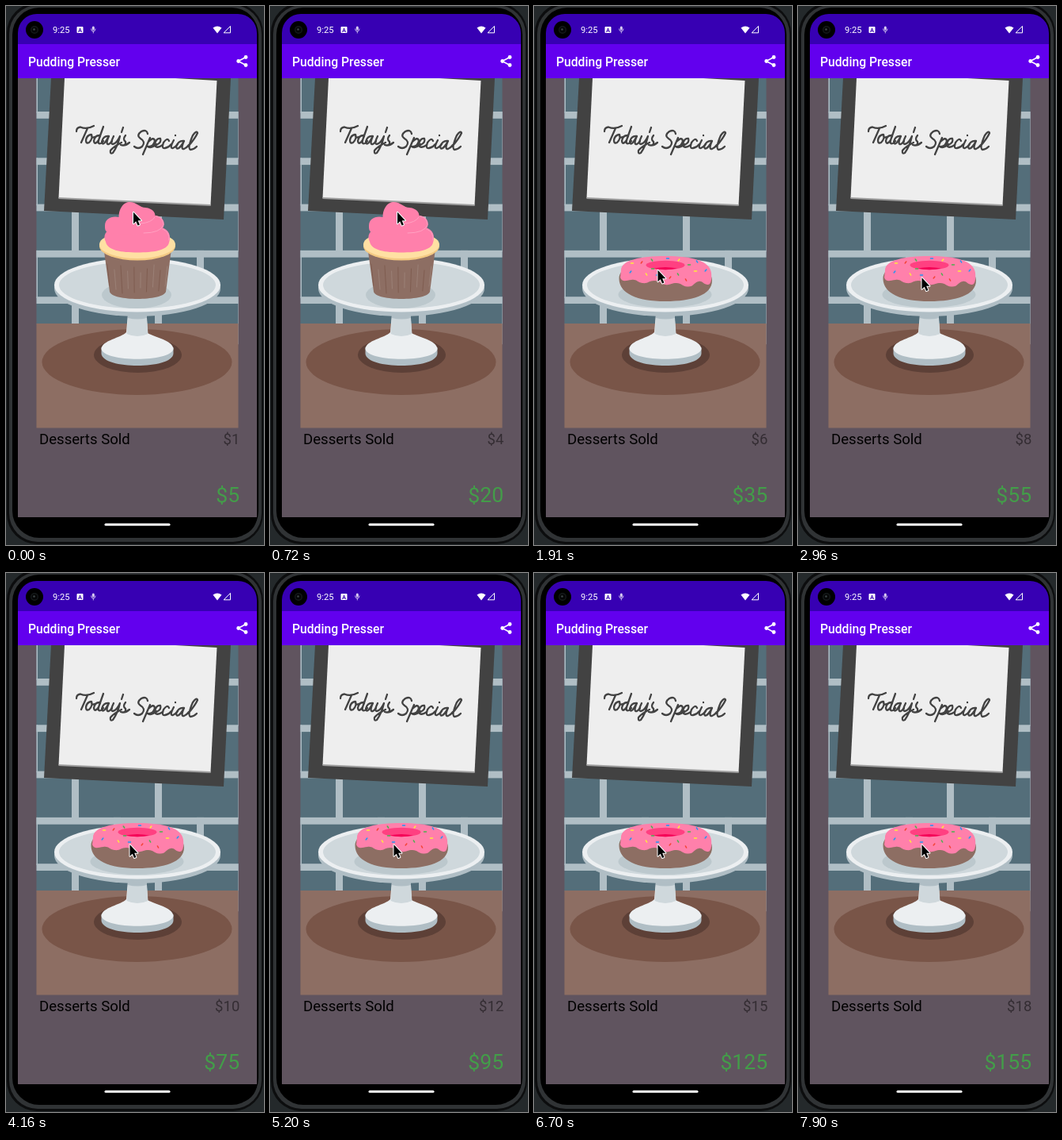
These frames come from a looping animation (326x679 px, 8 s). An HTML page with a canvas:

```html
<!DOCTYPE html>
<html lang="en">
<head>
<meta charset="utf-8">
<title>Dessert counter</title>
<style>
html, body { margin: 0; width: 100%; height: 100%; overflow: hidden; background: #202426; }
canvas { display: block; width: 326px; height: 679px; }
</style>
</head>
<body>
<canvas id="stage"></canvas>
<script>
const W = 326, H = 679, LOOP = 8000, SWITCH = 1010;
const canvas = document.getElementById('stage');
const ctx = canvas.getContext('2d');
const dpr = window.devicePixelRatio || 1;
canvas.width = W * dpr;
canvas.height = H * dpr;

const SALES = [150, 450, 720, 1010, 1610, 2510, 2960, 3560, 4160,
  4600, 5200, 5650, 6250, 6700, 7150, 7450, 7900];
const MOVES = [[0, 161, 259], [1760, 157, 300], [1910, 156.5, 332],
  [2060, 156.5, 342.5], [2210, 156.5, 341.5]];

function rect(x, y, w, h, color) {
  ctx.fillStyle = color;
  ctx.fillRect(x, y, w, h);
}
function oval(x, y, rx, ry, color) {
  ctx.fillStyle = color;
  ctx.beginPath();
  ctx.ellipse(x, y, rx, ry, 0, 0, Math.PI * 2);
  ctx.fill();
}
function round(x, y, w, h, r, color) {
  ctx.fillStyle = color;
  ctx.beginPath();
  ctx.roundRect(x, y, w, h, r);
  ctx.fill();
}
function fill(d, color) {
  ctx.fillStyle = color;
  ctx.fill(new Path2D(d));
}
function line(d, color, width) {
  ctx.strokeStyle = color;
  ctx.lineWidth = width;
  ctx.lineCap = ctx.lineJoin = 'round';
  ctx.stroke(new Path2D(d));
}
function label(text, x, y, size, color, align = 'left', weight = 400) {
  ctx.font = `${weight} ${size}px Roboto, sans-serif`;
  ctx.textAlign = align;
  ctx.fillStyle = color;
  ctx.fillText(text, x, y);
}

function phone() {
  rect(0, 0, W, H, '#24292b');
  round(1, -4, 324, 682, 38, '#0c0d0e');
  round(4, -1, 319, 676, 36, '#303335');
  round(8, 2, 311, 668, 34, '#000');
}

function statusBar() {
  rect(15, 10, 302, 38, '#3700b3');
  rect(15, 48, 302, 43.5, '#6200ee');
  oval(36, 30, 11, 11, '#000');
  oval(36, 30, 5, 5, '#14191a');
  oval(36, 30, 3.6, 3.6, '#050606');
  oval(35.5, 29.5, 1.3, 1.3, '#3b4446');
  label('9:25', 59, 34, 11.2, '#fff');

  round(89.5, 26, 8, 8, 1, '#fff');
  label('A', 93.5, 32.7, 7.5, '#3700b3', 'center', 700);
  round(108.8, 25.5, 3, 5, 1.5, '#d9ccf1');
  line('M107.6 29Q107.8 32 110.3 32Q112.8 32 113 29M110.3 32V34', '#d9ccf1', 0.9);

  fill('M261.5 27.5Q267 23.5 272.5 27.5L267 34.5Z', '#fff');
  line('M275.5 33.8H283.5V25.8Z', '#fff', 1);

  label('Pudding Presser', 28, 75.5, 15.7, '#fff', 'left', 500);
  line('M303 64.5L293.5 69.5L303 74.5', '#fff', 1.5);
  for (const [x, y] of [[303, 64.5], [293.7, 69.5], [303, 74.5]]) oval(x, y, 2.4, 2.4, '#fff');
}

function wall() {
  rect(38, 91, 256, 310, '#546e7a');
  for (let row = 0; row < 6; row++) {
    const y = 74.7 + row * 58.3;
    rect(38, y, 256, 8.8, '#b0bec5');
    for (let x = row % 2 ? 83 : 31; x < 294; x += 105) rect(x, y, 9, 60, '#b0bec5');
  }
}

const LETTERS = [
  'M89 158Q89 153 94 152.5Q102 156 111 151M103 154Q99 163 95 172',
  'M107 162Q102 163 101 169Q101 174 105 172Q110 167 108 162Q108 167 112 165',
  'M118 163Q112 163 111 170Q112 176 117 169L123 152M119 164Q114 175 120 173Q122 172 123 170',
  'M130 164Q123 163 121 171Q122 177 127 169L130 164Q125 175 130 174Q132 173 134 170',
  'M136 164Q131 174 135 174Q140 173 144 164Q141 177 135 185Q131 187 132 182Q136 177 146 172',
  'M148 153L146 159',
  'M151 163Q147 168 151 171Q152 177 145 175Q150 177 156 172',
  'M179 161Q178 155 171 158Q164 163 170 167Q177 171 172 177Q167 181 162 177',
  'M182 166L173 187M180 171Q187 164 188 170Q186 178 179 177Q184 180 190 174',
  'M190 175Q197 172 195 167Q190 166 188 174Q189 181 198 175',
  'M206 170Q204 165 199 172Q196 180 201 179Q206 178 209 174',
  'M212 169Q206 180 211 179Q214 178 217 174M214 163V163.2',
  'M225 170Q218 169 215 177Q216 183 222 175L225 170Q220 181 225 180Q228 179 231 175',
  'M230 177Q239 167 242 160Q241 156 236 163Q229 179 233 181Q237 181 241 177'
];

function sign() {
  fill('M57 91H284L275 269L48 258Z', '#424242');
  fill('M74 91H214L266.5 94L258.5 251L66.5 242Z', '#eee');
  fill('M66.5 241L258.6 250V252L66.5 243Z', '#9e9e9e');
  for (const d of LETTERS) line(d, '#424242', 2.3);
}

function table() {
  rect(38, 400, 256, 132, '#8d6e63');
  oval(165.5, 448.5, 120, 41.5, '#795548');
  oval(166.5, 439.5, 55.5, 22.5, '#5d4037');
}

function stand() {
  fill('M120.5 430V438C122 458 210 458 211.5 438V430Z', '#b0bec5');
  fill('M154 388H177.5L179 412C187 417 211 421 211.5 432C209 449 123 449 120.5 432C121 421 146 418 152 411Z', '#eceff1');
  fill('M154.5 386H177.5L179.5 413Q166 419 152.5 413Z', '#cfd8dc');
  fill('M154.5 386H177.5L178 393Q166 396 154 393Z', '#b0bec5');
  oval(166, 356, 105, 35, '#b0bec5');
  oval(166, 351.5, 105, 34, '#eceff1');
  oval(166, 351.5, 99, 29.5, '#cfd8dc');
}

function cupcake() {
  oval(165, 364, 44, 17, '#bcc8cd');
  fill('M123.5 306L131 360C134 372 198 372 202 360L209 306Z', '#8d6e63');
  for (let i = 0; i < 10; i++) {
    const k = i - 4.5, top = 325 + (i * 7) % 12, end = 352 + (i * 5) % 11;
    const x = y => 166 + k * (8.6 - (y - 320) * 0.024);
    line(`M${x(top)} ${top}L${x(end)} ${end}`, i % 2 ? '#a1887f' : '#795548', 0.7);
  }
  oval(166, 302.5, 48, 18, '#f3c983');
  oval(166, 300.5, 48, 17.5, '#ffe0a3');
  const pink = '#ff80ab', glow = '#ffa1c2';
  fill('M126 297C122 290 126 282 134 281L196 279C206 281 209 290 206 298C204 308 186 310.5 166 310.5C146 310.5 128 308 126 297Z', pink);
  fill('M125 277C125 268 133 264 143 266L190 264C199 266 202 274 198 280C190 288 136 290 128 285C125 283 125 280 125 277Z', pink);
  fill('M143 270C141 258 147 248 155 247C164 246 169 254 176 254C186 255 190 261 188 268C180 276 150 276 143 270Z', pink);
  line('M188 266Q184 273 170 274M199 276Q195 286 174 286M190 265Q198 266 199 275M198 281Q207 284 206 295', glow, 1);
}

const SPRINKLES = [
  [124, 324, 0], [136, 323, 1], [149, 320, 2], [169, 318, 3], [183, 320, 0],
  [206, 322, 3], [196, 326, 2], [122, 335, 3], [142, 338, 0], [156, 339, 3],
  [172, 342, 1], [182, 338, 2], [204, 334, 0], [217, 333, 3], [192, 345, 1], [150, 331, 2]
];
const CANDY = ['#ffeb3b', '#f44336', '#4caf50', '#2196f3'];

function donut() {
  oval(165.5, 363.5, 59, 16.5, '#bcc8cd');
  fill('M107.5 344C107 328 130 322 166 322C205 322 225 330 225 346C225 364 200 372 166 372C130 372 108 362 107.5 344Z', '#8d6e63');
  fill('M110 333C110 320 135 315 166 315C200 315 222 321 224 336C225 346 223 352 219 351C213 350 213 346 208 347C202 348 202 354 194 353.5C186 353 187 349 180 349C173 349 172 352 166 351C160 350 159 346 152 346C145 346 144 350 137 349C130 348 130 344 123 345C116 346 111 348 109 342Z', '#ff80ab');
  oval(166, 326.5, 24.5, 5.7, '#ff4081');
  fill('M151 330.5Q166 327.5 181 330.5Q166 334 151 330.5Z', '#f50057');
  SPRINKLES.forEach(([x, y, c], i) => {
    const a = i * 2.1, dx = Math.cos(a) * 1.5, dy = Math.sin(a) * 1.2;
    line(`M${x - dx} ${y - dy}L${x + dx} ${y + dy}`, CANDY[c], 1.5);
  });
}

function totals(t) {
  const sold = 1 + SALES.filter(s => s <= t).length;
  const earned = sold <= 5 ? sold * 5 : 25 + (sold - 5) * 10;
  label('Desserts Sold', 42, 552, 18.6, '#000');
  label('$' + sold, 295.3, 552, 18.5, '#342d33', 'right');
  label('$' + earned, 295.2, 625, 26.6, '#439d49', 'right');
}

function cursor(t) {
  const [, x, y] = MOVES.filter(m => m[0] <= t).pop();
  ctx.save();
  ctx.translate(x, y + 0.8);
  ctx.scale(0.9, 0.93);
  const arrow = 'M0 0V15.5L3.6 12.2L6.2 18L8.8 16.9L6.3 11.3H11Z';
  line(arrow, '#fff', 2.2);
  fill(arrow, '#000');
  ctx.restore();
}

function draw(t) {
  ctx.setTransform(dpr, 0, 0, dpr, 0, 0);
  phone();
  ctx.save();
  ctx.beginPath();
  ctx.roundRect(15, 10, 302, 657, 24);
  ctx.clip();
  statusBar();
  rect(15, 91, 302, 553, '#60545f');
  ctx.save();
  ctx.beginPath();
  ctx.rect(38.5, 91, 255, 440.6);
  ctx.clip();
  wall();
  sign();
  table();
  stand();
  if (t < SWITCH) cupcake(); else donut();
  ctx.restore();
  totals(t);
  rect(15, 644, 302, 26, '#000');
  round(124.5, 651.8, 83, 3, 1.5, '#fff');
  ctx.restore();
  cursor(t);
}

const start = performance.now();
function tick() {
  draw((performance.now() - start) % LOOP);
  requestAnimationFrame(tick);
}
tick();
</script>
</body>
</html>
```
